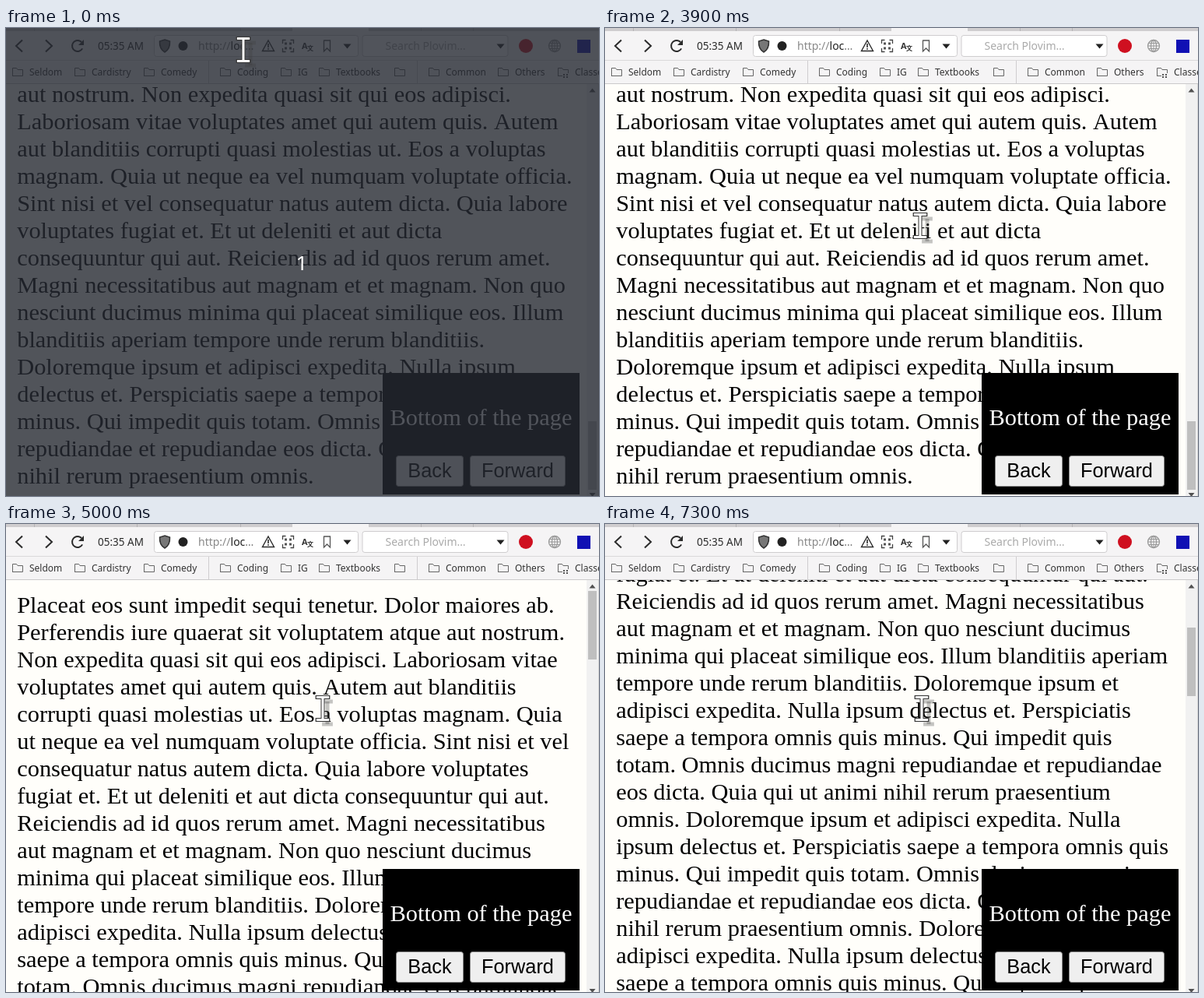
An HTML page with a canvas for the animation above (8 s loop, 762 px wide and 601 px high).

```html
<!DOCTYPE html>
<html lang="en">
<head>
<meta charset="utf-8">
<title>Page scroll</title>
<style>
html, body { margin: 0; width: 762px; height: 601px; overflow: hidden; background: #fffefa; }
canvas { display: block; }
</style>
</head>
<body>
<canvas id="stage" width="762" height="601"></canvas>
<script>
const ctx = document.getElementById('stage').getContext('2d');
const LOOP = 8000, LINE = 35, BOTTOM = 2450, TOP = -89;
const SERIF = '30.4px "Liberation Serif", serif';
const UI = '"Noto Sans", sans-serif';
const INK = '#2b2b2b';

// ---- page text ----
const opening = 'Placeat eos sunt impedit sequi tenetur. Dolor maiores ab. ' +
  'Perferendis iure quaerat sit voluptatem atque aut nostrum. ';
const middle = 'Non expedita quasi sit qui eos adipisci. Laboriosam vitae voluptates amet qui autem quis. ' +
  'Autem aut blanditiis corrupti quasi molestias ut. Eos a voluptas magnam. Quia ut neque ea vel numquam ' +
  'voluptate officia. Sint nisi et vel consequatur natus autem dicta. Quia labore voluptates fugiat et. ' +
  'Et ut deleniti et aut dicta consequuntur qui aut. Reiciendis ad id quos rerum amet. Magni necessitatibus ' +
  'aut magnam et et magnam. Non quo nesciunt ducimus minima qui placeat similique eos. Illum blanditiis ' +
  'aperiam tempore unde rerum blanditiis. ';
const closing = 'Doloremque ipsum et adipisci expedita. Nulla ipsum delectus et. Perspiciatis saepe a tempora ' +
  'omnis quis minus. Qui impedit quis totam. Omnis ducimus magni repudiandae et repudiandae eos dicta. ' +
  'Quia qui ut animi nihil rerum praesentium omnis. ';

function wrap(text, width) {
  ctx.font = SERIF;
  const out = [];
  let row = '';
  for (const word of text.trim().split(' ')) {
    const next = row ? row + ' ' + word : word;
    if (ctx.measureText(next).width > width) {
      out.push(row);
      row = word;
    } else row = next;
  }
  return out.concat(row);
}

const block = opening + middle + closing.repeat(3);
const lines = wrap(block.repeat(4), 715.6).slice(0, 72)
  .concat(wrap('aut nostrum. ' + middle + closing, 715.6));

// ---- timeline: [start ms, value...] ----
const scrolls = [[0, BOTTOM], [1100, TOP], [1200, BOTTOM], [2100, 2448], [2200, 2449], [2300, BOTTOM],
  [4200, 2000], [4300, 1400], [4500, 700], [4600, 350], [4800, 130], [5000, TOP], [5500, 6],
  [6500, 101], [7300, 196]];
const pointer = [[0, 305, 28], [1800, 328, 104], [1900, 353, 188], [2100, 386, 268], [2200, 400, 289],
  [3800, 402, 272], [3900, 405, 254], [4200, 407, 237]];

const at = (keys, t) => keys.reduce((a, k) => (t >= k[0] ? k : a));

function infoWidth(t) {
  if (t < 1000) return 0;
  if (t < 1200) return t < 1100 ? 48 : 96;
  if (t < 3000) return 120;
  const p = Math.min(1, (Math.floor((t - 3000) / 100) + 1) / 7);
  return 120 * (1 - p * p * (3 - 2 * p));
}

// ---- drawing helpers ----
function rect(x, y, w, h, color) {
  ctx.fillStyle = color;
  ctx.fillRect(x, y, w, h);
}

function box(x, y, w, h, r, fill, stroke) {
  ctx.beginPath();
  ctx.roundRect(x, y, w, h, r);
  ctx.fillStyle = fill;
  ctx.fill();
  ctx.strokeStyle = stroke;
  ctx.lineWidth = 1;
  ctx.stroke();
}

function path(points, color, width, fill) {
  ctx.beginPath();
  points.forEach(([x, y], i) => (i ? ctx.lineTo(x, y) : ctx.moveTo(x, y)));
  if (fill) {
    ctx.fillStyle = color;
    ctx.closePath();
    ctx.fill();
  } else {
    ctx.strokeStyle = color;
    ctx.lineWidth = width;
    ctx.stroke();
  }
}

function disc(x, y, r, color) {
  ctx.beginPath();
  ctx.arc(x, y, r, 0, 7);
  ctx.fillStyle = color;
  ctx.fill();
}

function text(str, x, y, font, color, align = 'left') {
  ctx.font = font;
  ctx.fillStyle = color;
  ctx.textAlign = align;
  ctx.fillText(str, x, y);
}

function caret(x, y, s, color, up) {
  const d = up ? -s * 0.6 : s * 0.6;
  path([[x - s, y - d], [x + s, y - d], [x, y + d]], color, 0, true);
}

function folder(x, y) {
  path([[x, y + 5], [x, y - 5], [x + 5, y - 5], [x + 6.5, y - 3], [x + 13, y - 3], [x + 13, y + 5], [x - 0.5, y + 5]], '#666', 1);
}

// ---- toolbar ----
function scanIcon(x) {
  for (const [a, b] of [[-1, -1], [1, -1], [1, 1], [-1, 1]]) {
    path([[x + 7 * a, 23 + 3 * b], [x + 7 * a, 23 + 7.5 * b], [x + 3 * a, 23 + 7.5 * b]], '#444', 1.3);
    rect(x + 3 * a - 1.5, 23 + 3 * b - 1.5, 3, 3, '#555');
  }
}

function warning(x) {
  path([[x, 16], [x + 7.5, 29.5], [x - 7.5, 29.5], [x, 16], [x + 1, 18]], INK, 1.4);
  rect(x - 0.8, 20, 1.6, 5, INK);
  rect(x - 0.8, 26, 1.6, 1.7, INK);
}

function reload() {
  ctx.beginPath();
  ctx.arc(92, 23, 7, 0.5, 5.5);
  ctx.strokeStyle = INK;
  ctx.lineWidth = 2;
  ctx.stroke();
  path([[100, 15], [100, 22], [93, 22]], INK, 0, true);
}

function globe(x) {
  ctx.strokeStyle = '#999';
  ctx.lineWidth = 1.3;
  for (const rx of [7.5, 3.5]) {
    ctx.beginPath();
    ctx.ellipse(x, 23, rx, 7.5, 0, 0, 7);
    ctx.stroke();
  }
  for (const y of [19.5, 23, 26.5]) path([[x - 7, y], [x + 7, y]], '#999', 1);
  path([[x, 15.5], [x, 30.5]], '#999', 1);
}

function toolbar(t) {
  const loading = t >= 1000 && t < 1500;
  const wide = infoWidth(t);
  const shift = wide - (loading ? Math.min(25, wide) : 0);

  rect(0, 0, 762, 72, '#f5f4f5');
  rect(0, 0, 762, 4, '#cfcdcf');
  rect(368, 0, 98, 4, '#f5f4f5');
  for (const x of [36, 168, 301, 533, 600]) rect(x, 0, 1, 4, '#b5b3b5');
  rect(0, 41, 762, 1, '#dad9da');
  rect(0, 71, 762, 1, '#cbcacb');

  path([[21, 15.5], [13, 23], [21, 30.5]], INK, 2);
  path([[51, 15.5], [59, 23], [51, 30.5]], INK, 2);
  if (loading) {
    path([[86, 17], [98, 29]], INK, 2);
    path([[98, 17], [86, 29]], INK, 2);
  } else reload();
  text('05:35 AM', 118, 28, '13.5px ' + UI, INK);

  box(190.5, 9.5, 262 + shift, 27, 3, '#fff', '#cfcdcf');
  ctx.beginPath();
  ctx.moveTo(204, 15);
  ctx.lineTo(210.5, 17);
  ctx.quadraticCurveTo(211, 27, 204, 31);
  ctx.quadraticCurveTo(197, 27, 197.5, 17);
  ctx.closePath();
  ctx.fillStyle = '#777';
  ctx.fill();
  ctx.strokeStyle = '#333';
  ctx.lineWidth = 1.5;
  ctx.stroke();
  disc(227.5, 23, 6, '#222');
  text('http://', 247, 28, '14px ' + UI, '#888');
  const label = ctx.measureText('http://').width;
  text('loc', 247 + label, 28, '14px ' + UI, '#222');
  text('…', 247 + label + ctx.measureText('loc').width, 28, '14px ' + UI, '#777');
  warning(337);

  if (wide > 0) {
    ctx.save();
    ctx.beginPath();
    ctx.rect(348, 10, wide, 26);
    ctx.clip();
    const bold = 'bold 10.5px ' + UI;
    text(loading ? '7 KB' : '0 bytes', 371, 26, bold, '#222', 'center');
    text(loading ? '1/2' : '1/0', 432.5, 26, bold, '#222', 'center');
    rect(401, 15, 1, 16, '#ddd');
    rect(462, 15, 1, 16, '#ddd');
    ctx.restore();
  }

  scanIcon(362.5 + wide);
  if (!loading) {
    text('A', 380 + wide, 27, 'bold 11px ' + UI, '#333');
    text('文', 387 + wide, 29, 'bold 8px "Noto Sans CJK SC", sans-serif', '#333');
  }
  const mark = 412.5 + shift;
  path([[mark - 4, 16], [mark + 4, 16], [mark + 4, 30], [mark, 26], [mark - 4, 30], [mark - 4, 15.5]], '#555', 1.3);
  caret(438.5 + shift, 23.5, 5, '#222');

  box(458 + shift, 9.5, 187, 27, 3, '#fff', '#cfcdcf');
  text('Search Plovim…', 487.5 + shift, 28, '14px ' + UI, '#aaa');
  caret(635.5 + shift, 23.5, 5, '#222');
  disc(668 + shift, 23, 9, '#cf1020');
  globe(705 + shift);
  rect(734 + shift, 15, 17, 17, '#1010b4');

  const marks = [[8, 'Seldom'], [88, 'Cardistry'], [177, 'Comedy'], [275, 'Coding'], [353, 'IG'],
    [402, 'Textbooks'], [499, ''], [543, 'Common'], [632, 'Others'], [709, 'Classes']];
  for (const [x, name] of marks) {
    folder(x + 0.5, 56.5);
    text(name, x + 22, 61, '12px ' + UI, '#333');
  }
  rect(715, 58, 9, 7, '#f5f4f5');
  for (const [x, y] of [[716, 59], [720, 59], [716, 62], [720, 62]]) rect(x, y, 2, 2, '#555');
  rect(260, 42, 1, 29, '#cfcdcf');
  rect(528, 42, 1, 29, '#cfcdcf');
}

// ---- page ----
function button(x, w, name) {
  box(x + 0.5, 549.5, w - 1, 39, 3, '#efefef', '#8a8a8a');
  text(name, x + w / 2, 577, '25.33px "Liberation Sans", sans-serif', '#000', 'center');
}

function page(scroll) {
  rect(0, 72, 762, 529, '#fffefa');
  ctx.save();
  ctx.beginPath();
  ctx.rect(0, 72, 746, 529);
  ctx.clip();
  lines.forEach((row, i) => {
    const y = 95 + LINE * (i - 2) - scroll;
    if (y > 55 && y < 630) text(row, 14.2, y, SERIF, '#000');
  });
  ctx.restore();

  rect(746, 72, 16, 529, '#f1f1f1');
  rect(761, 72, 1, 529, '#d5d5d5');
  rect(748, Math.round(101 + scroll * 0.1649), 11, 88, '#bfbfbf');
  caret(753.5, 80, 4, '#505050', true);
  caret(753.5, 599.5, 4, '#505050');

  rect(484, 443, 253, 156, '#000');
  text('Bottom of the page', 610.5, 510, SERIF, '#fff', 'center');
  button(501, 87, 'Back');
  button(596, 123, 'Forward');
}

function beam(x, y, color, width) {
  const s = 7 - (6 - width) / 8;
  path([[x - s, y - 14.5], [x + s, y - 14.5]], color, width);
  path([[x - s, y + 14.5], [x + s, y + 14.5]], color, width);
  path([[x, y - 14.5], [x, y + 14.5]], color, width);
}

function cursor(t) {
  const [, x, y] = at(pointer, t);
  const near = t >= 4600 && t < 6500;
  beam(x + (near ? 6 : 9), y + 5.5, 'rgba(60,60,60,0.3)', 5);
  ctx.lineCap = 'square';
  beam(x, y, '#333', 5);
  beam(x, y, '#fff', 3);
  ctx.lineCap = 'butt';
}

function draw(t) {
  page(at(scrolls, t)[1]);
  toolbar(t);
  if (t < 100) {
    rect(0, 0, 762, 601, 'rgba(38,42,50,0.8)');
    text('1', 380, 311, '26px ' + UI, '#fff', 'center');
  }
  cursor(t);
}

const start = performance.now();
function tick() {
  draw((performance.now() - start) % LOOP);
  requestAnimationFrame(tick);
}
tick();
</script>
</body>
</html>
```
